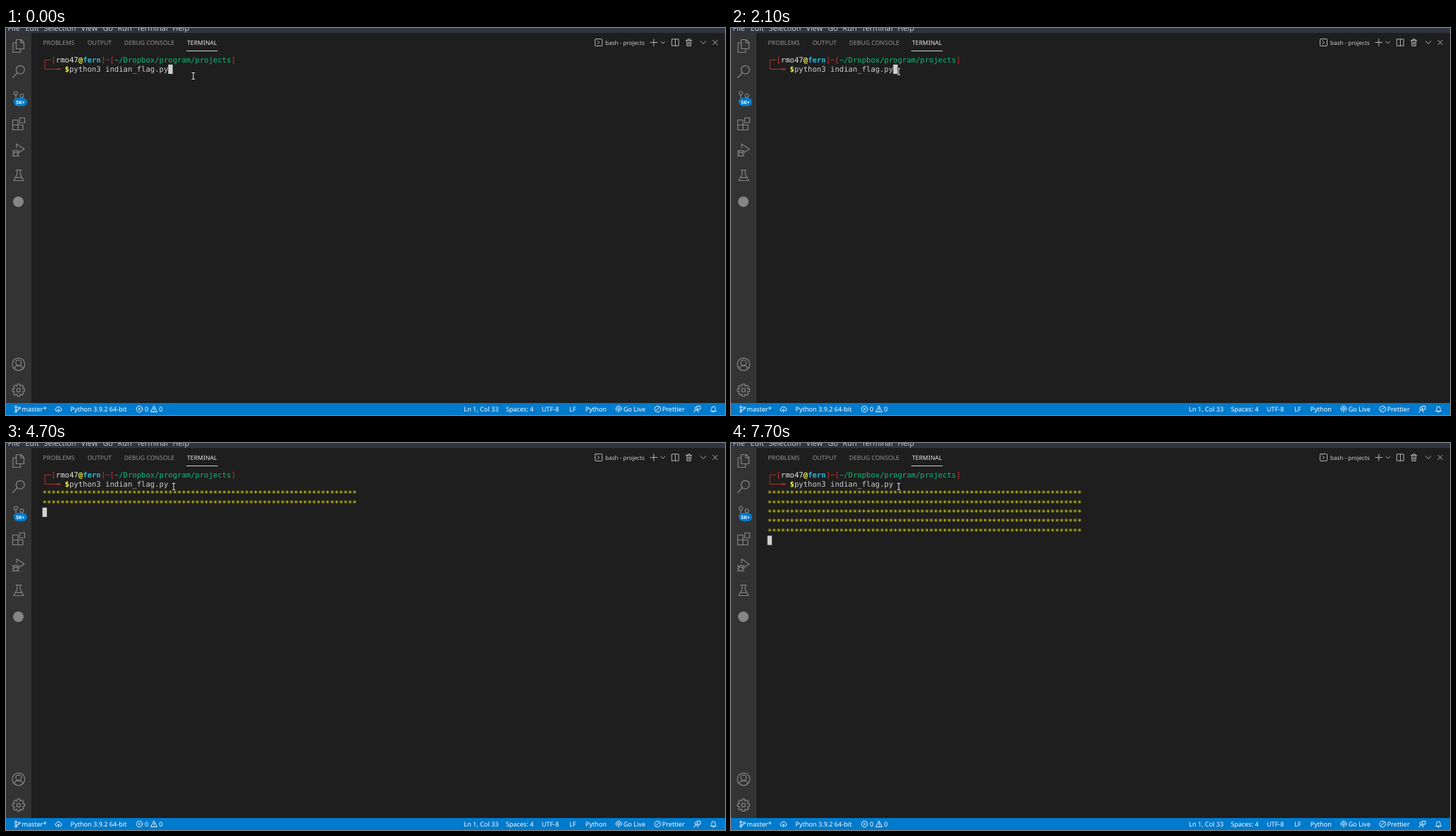
An HTML page for the animation above (8000 ms loop, 1021x549 px).

```html
<!DOCTYPE html>
<html lang="en">
<head>
<meta charset="utf-8">
<title>Terminal</title>
<style>
  html, body { margin: 0; width: 100%; height: 100%; overflow: hidden; background: #1e1e1e; }
  svg { display: block; width: 100%; height: 100%; }
  text { font-family: "Noto Sans", sans-serif; text-rendering: geometricPrecision; white-space: pre; }
  .mono text { font: 10.6px "DejaVu Sans Mono", monospace; fill: #ccc; }
  .menu text { font-size: 10.8px; fill: #c3c7cf; }
  .tabs text { font-size: 8.7px; fill: #929292; }
  .status text { font-size: 9.1px; fill: #fff; }
  .icons { fill: none; stroke-linejoin: round; stroke-linecap: round; }
  .b { font-weight: bold; }
</style>
</head>
<body>
<svg viewBox="0 0 1021 549" preserveAspectRatio="none">
  <rect width="1021" height="549" fill="#1e1e1e"/>
  <rect width="1021" height="7" fill="#2f3440"/>
  <rect y="7" width="36" height="525" fill="#333"/>
  <rect y="532" width="1021" height="17" fill="#007acc"/>
  <svg width="1021" height="7"><g id="menu" class="menu"></g></svg>
  <g id="tabs" class="tabs"></g>
  <path d="M256 32.5H300.500" stroke="#e7e7e7" stroke-width=".9"/>
  <text x="851" y="23.600" font-size="8.15" fill="#d0d0d0">bash - projects</text>

  <!-- activity bar -->
  <g class="icons" stroke="#858585" stroke-width="1.2">
    <path d="M14.500 16.500H21.500L25.500 20.500V29.500H14.500ZM21 16.500V21H25.500M14.500 21H10V34.500H20.500V29.500"/>
    <circle cx="20.300" cy="59.200" r="5.900"/>
    <path d="M16 63.500L9.500 70.500"/>
    <circle cx="14" cy="92.500" r="2.500"/>
    <circle cx="22.500" cy="96" r="2.500"/>
    <circle cx="14" cy="104" r="2.500"/>
    <path d="M14 95V101.500M22.500 98.500C22.500 101 20 101 17 101"/>
    <path d="M9.500 130.500H17V144.500H9.500ZM9.500 137.500H24V144.500H17M19.500 127.500H26.500V134.500H19.500Z"/>
    <path d="M15 170V164.500L26 171.700L18.500 176.600"/>
    <path d="M11 176.500a2.800 2.800 0 0 1 5.600 0V179a2.800 2.800 0 0 1-5.600 0ZM11 176.500H16.600M9 173.800L11.300 175.500M18.600 173.800L16.300 175.500M8.800 178H11M16.600 178H18.800M9.200 182L11.400 180M18.400 182L16.200 180"/>
    <path d="M14 201.500H22M15.800 201.500V207.500L11 216.500H25L20.200 207.500V201.500M13.300 212.200H22.700"/>
    <circle cx="17.800" cy="477" r="8.900"/>
    <circle cx="17.800" cy="474.800" r="3.900"/>
    <path d="M11.800 483.500C12.500 477.300 23.100 477.300 23.800 483.500"/>
    <path id="gear"/>
    <circle cx="17.800" cy="513.700" r="2.600"/>
  </g>
  <circle cx="17.500" cy="246.500" r="7.500" fill="#858585"/>
  <rect x="11" y="99" width="19" height="12" rx="6" fill="#007acc"/>
  <text x="20.500" y="107.600" font-size="6.900" font-weight="600" fill="#fff" text-anchor="middle">5K+</text>

  <!-- panel actions -->
  <g class="icons" stroke="#c5c5c5" stroke-width=".9">
    <rect x="836.500" y="15.500" width="10" height="10" rx=".8"/>
    <path d="M839.800 18L842.600 20.500L839.800 23"/>
    <path d="M915 20.500H924.800M919.900 15.600V25.400M930 19.200L932.800 22L935.600 19.200"/>
    <path d="M945.800 15.800H955.200V25.200H945.800ZM950.500 15.800V25.200"/>
    <path d="M965.500 17.500H973.800M968 17.500V15.800H971.300V17.500M966.500 17.500L967 25.500H972.300L972.800 17.500M968.700 19.500V23.500M970.600 19.500V23.500"/>
    <path d="M986.500 18.700L990.200 22.300L993.900 18.700M1003.800 17.300L1010.200 23.700M1010.200 17.300L1003.800 23.700"/>
  </g>

  <!-- status bar -->
  <g id="status" class="status"></g>
  <g class="icons" stroke="#fff" stroke-width=".9">
    <circle cx="14" cy="537.600" r="1.400"/>
    <circle cx="18.700" cy="539" r="1.400"/>
    <circle cx="14" cy="543.800" r="1.400"/>
    <path d="M14 539V542.400M18.700 540.400C18.700 542 16.500 541.800 14 542"/>
    <path d="M72.500 543.500H71.800A2.200 2.200 0 0 1 71.800 539.200A2.900 2.900 0 0 1 77.300 539.200A2.200 2.200 0 0 1 77.300 543.500H76.600M74.600 544.800V541M73 542.400L74.600 540.800L76.200 542.400"/>
    <circle cx="189.500" cy="540.600" r="4.300"/>
    <path d="M187.900 539L191.100 542.200M191.100 539L187.900 542.200"/>
    <path d="M210.300 536.300L214.600 544.500H206ZM210.300 539.300V541.700M210.300 543.100V543.200"/>
    <path d="M867.700 543.500A4 4 0 1 1 872.300 543.500M868.600 541.500A1.900 1.900 0 1 1 871.400 541.500M870 540.300V545"/>
    <circle cx="925.300" cy="540.600" r="4.300"/>
    <path d="M922.300 543.600L928.300 537.600"/>
    <path d="M981 536.500H986V541H984.500L982.800 542.500V541M977.300 545C977.300 540.800 983 540.800 983 545"/>
    <circle cx="980" cy="539.700" r="1.900"/>
    <path d="M1001 543.200C1002 542 1002 541 1002 539.500A2.600 2.600 0 0 1 1007.200 539.500C1007.200 541 1007.200 542 1008.200 543.200ZM1003.700 544.800H1005.500"/>
  </g>

  <!-- terminal -->
  <rect id="bar" x="51.700" y="65.200" width="951.800" height="13.100" fill="#565656"/>
  <path d="M64.300 45.300H55.200V58.400H72M141.500 45.300H147.500" fill="none" stroke="#cd3131" stroke-width=".9"/>
  <path d="M72 58.400H77.500" stroke="#cd3131" stroke-width="1.800"/>
  <g id="term" class="mono"></g>
  <rect id="cursor" width="6.400" height="13.200" fill="#d0d0d0"/>
  <g id="pointer" fill="none">
    <path d="M-2.300-4.500H2.300M0-4.500V4.500M-2.300 4.500H2.300" stroke="#111" stroke-width="2.600"/>
    <path d="M-2.300-4.500H2.300M0-4.500V4.500M-2.300 4.500H2.300" stroke="#e4e4e4" stroke-width="1.100"/>
  </g>
</svg>
<script>
const LOOP = 8000, LEFT = 51.7, TOP = 38.6, CELL = 6.381, LINE = 13.27;
const ROW_TIMES = [3800, 4700, 5800, 6700, 7700];
const POINTER = [[0, 266, 68], [1200, 238, 61], [1300, 213, 56], [1500, 228, 59], [1600, 238.2, 61.8]];
const $ = id => document.getElementById(id);

function addText(parent, x, y, str, fill, bold) {
  const el = document.createElementNS("http://www.w3.org/2000/svg", "text");
  el.setAttribute("x", x);
  el.setAttribute("y", y);
  if (fill) el.style.fill = fill;
  if (bold) el.style.fontWeight = "bold";
  el.textContent = str;
  $(parent).append(el);
  return el;
}

const labels = (parent, y, items) => items.map(([x, str]) => addText(parent, x, y, str));
const cell = (col, row, str, fill, bold) =>
  addText("term", LEFT + col * CELL, TOP + 10.35 + row * LINE, str, fill, bold);

labels("menu", 4.4, [[2.5, "File"], [27.5, "Edit"], [53.5, "Selection"], [106.5, "View"],
  [137.5, "Go"], [158.5, "Run"], [185.500, "Terminal"], [236.500, "Help"]]);
const tabs = labels("tabs", 23.6, [[52.500, "PROBLEMS"], [115.700, "OUTPUT"],
  [167.700, "DEBUG CONSOLE"], [257, "TERMINAL"]]);
tabs[3].style.fill = "#e7e7e7";
labels("status", 543.9, [[22.500, "master*"], [91.500, "Python 3.9.2 64-bit"], [197, "0"], [217.300, "0"],
  [650.300, "Ln 1, Col 33"], [709.700, "Spaces: 4"], [760.700, "UTF-8"], [800, "LF"], [822.700, "Python"],
  [876.700, "Go Live"], [931.700, "Prettier"]]);

const RED = "#cd3131", YELLOW = "#f5f543";
cell(2, 0, "[", RED);
cell(3, 0, "rmo47", "#e5e5e5");
cell(8, 0, "@", YELLOW, true);
cell(9, 0, "fern", "#29b8db", true);
cell(13, 0, "]", RED);
cell(15, 0, "[", RED);
cell(16, 0, "~/Dropbox/program/projects", "#0dbc79");
cell(42, 0, "]", RED);
cell(5, 1, "$", YELLOW, true);
cell(6, 1, "python3 indian_flag.py");
const rows = ROW_TIMES.map((_, i) => cell(0, i + 2, "*".repeat(70), "#e5e510"));

// Eight-toothed cog outline
const cog = [];
for (let i = 0; i < 8; i++) {
  for (const [offset, r] of [[-.3, 6.4], [-.2, 8.8], [.2, 8.8], [.3, 6.4]]) {
    const a = i * Math.PI / 4 + offset;
    cog.push(`${17.8 + r * Math.cos(a)} ${513.7 + r * Math.sin(a)}`);
  }
}
$("gear").setAttribute("d", `M${cog.join("L")}Z`);

const show = (el, on) => el.setAttribute("visibility", on ? "visible" : "hidden");

function render(t) {
  const count = ROW_TIMES.filter(at => t >= at).length;
  const running = t >= 2700;
  const [, x, y] = POINTER.filter(([at]) => t >= at).pop();
  show($("bar"), t >= 1100 && t < 2100);
  rows.forEach((row, i) => show(row, i < count));
  $("cursor").setAttribute("x", LEFT + (running ? 0 : 28 * CELL));
  $("cursor").setAttribute("y", TOP + (running ? count + 2 : 1) * LINE);
  $("pointer").setAttribute("transform", `translate(${x} ${y})`);
}

const start = performance.now();
function tick() {
  render((performance.now() - start) % LOOP);
  requestAnimationFrame(tick);
}
tick();
</script>
</body>
</html>
```
